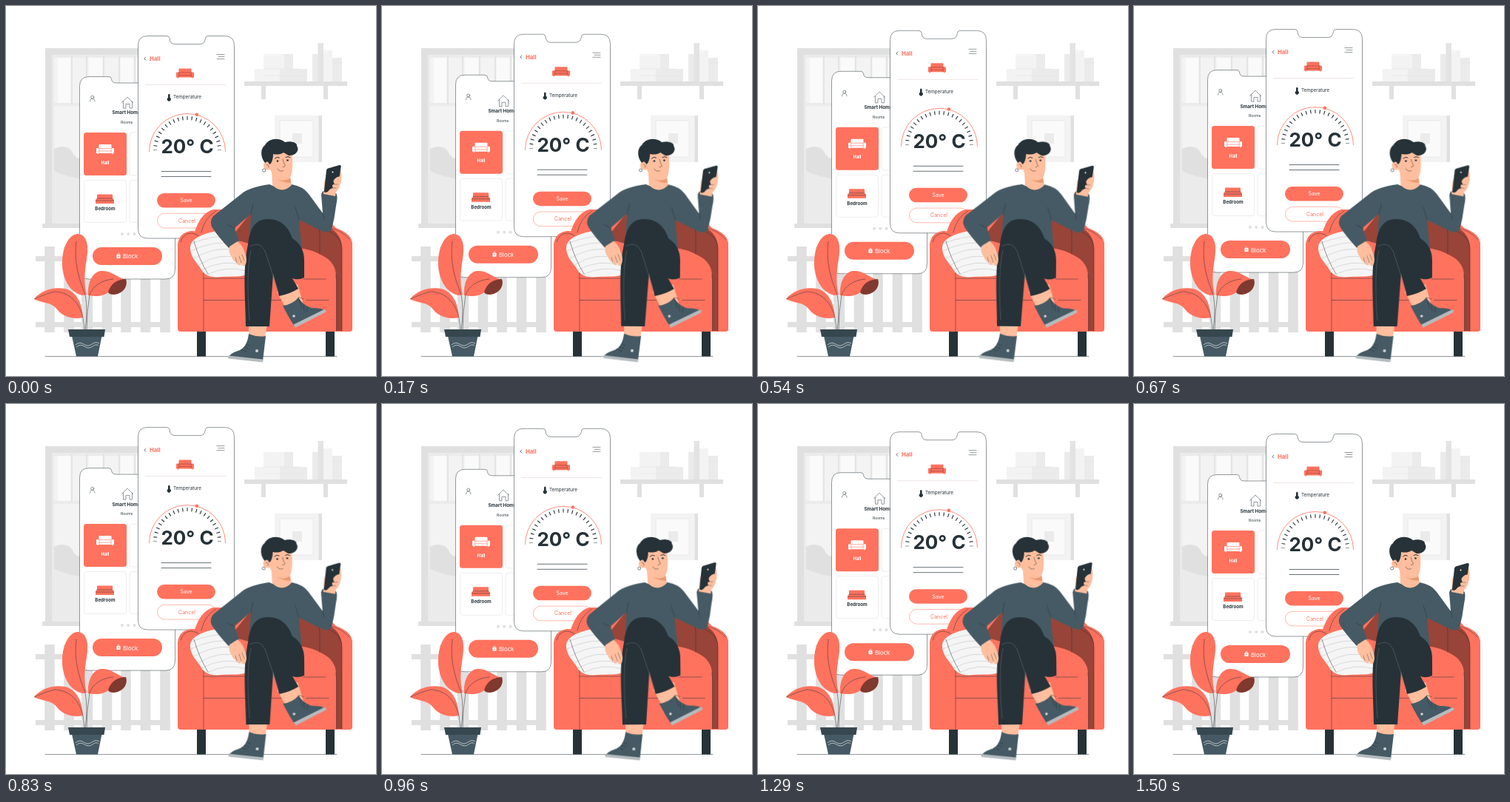
Recreate the animation shown at these times as an HTML page. Size 500 by 500 pixels, loop 1540 ms.

```html
<!DOCTYPE html>
<html lang="en">
<head>
<meta charset="utf-8">
<title>Smart home</title>
<style>
  html, body { margin: 0; width: 100%; height: 100%; overflow: hidden; background: #fff; }
  svg { display: block; width: 100vw; height: 100vh; }
  text { font-family: Inter, "Open Sans", sans-serif; }
  .bold { font-weight: 700; }
  .mid { text-anchor: middle; }
  .coral { fill: #ff725e; }
  .shade { fill: #994438; }
  .dark { fill: #263238; }
  .slate { fill: #455a64; }
  .skin { fill: #ffbe9d; }
  .white { fill: #fff; }
  .g1 { fill: #e0e0e0; }
  .g2 { fill: #ebebeb; }
  .g3 { fill: #f3f3f3; }
  .ink { fill: none; stroke: #263238; stroke-width: .5; stroke-linecap: round; stroke-linejoin: round; }
  .pale { fill: none; stroke: #e6e6e6; stroke-width: .7; }
  .screen { fill: #fff; stroke: #263238; stroke-width: .5; }

  /* 1500 ms of motion, then a 40 ms rest */
  #phones { animation: float 1540ms linear infinite; }
  #man { transform-box: view-box; transform-origin: 365px 331px; animation: sway 1540ms linear infinite; }
  @keyframes float {
    0%, 97.4%, 100% { transform: translateY(0); }
    48.7% { transform: translateY(-10px); }
  }
  @keyframes sway {
    0%, 97.4%, 100% { transform: rotate(0deg); }
    24.35% { transform: rotate(1deg); }
    73.05% { transform: rotate(-1deg); }
  }
</style>
</head>
<body>
<svg viewBox="0 0 500 500" xmlns="http://www.w3.org/2000/svg">
  <defs>
    <g id="sofa">
      <path d="M3.500 5V1Q3.500 0 4.500 0H19.500Q20.500 0 20.500 1V5H23Q24 5 24 6V12H22.500V13H21V12H3V13H1.500V12H0V6Q0 5 1 5Z"/>
    </g>
    <path id="seams" d="M3.800 5V11.500M20.200 5V11.500M3.800 5.500H20.200M3.800 9H20.200" fill="none" stroke-width=".6"/>
  </defs>

  <g id="window">
    <path class="g1" d="M53 57H225V300H53Z"/>
    <path class="g2" d="M62 66H225V294H62Z"/>
    <path class="g3" d="M65 70H225V131H65ZM65 135H225V290H65Z"/>
    <path class="white" opacity=".65" d="M70 70H87V131H70ZM112 70H130V131H112ZM155 70H172V131H155Z"/>
    <path d="M89 68V132M109 68V132M132 68V132M153 68V132M174 68V132" stroke="#e0e0e0" stroke-width="1.500"/>
    <path class="g1" d="M65 193C76 187 87 190 91 200C94 205 98 206 104 207V234C90 232 77 229 65 223Z"/>
    <path class="g2" d="M65 223C77 229 90 232 104 234V290H65Z"/>
    <path class="g1" d="M49 294H225V300H49Z"/>
  </g>

  <g id="fence" class="g1">
    <path d="M40 338H222V345H40ZM40 427H222V434H40Z"/>
    <path d="M59 325V441M85 325V441M110.500 325V441M136.500 325V441M162 325V441M188.500 325V441M215 325V441" stroke="#e0e0e0" stroke-width="13.500"/>
  </g>

  <g id="shelf">
    <path class="g1" d="M322 102H461V108H322ZM345 108H351V126H345ZM429 108H435V126H429Z"/>
    <path class="g3" d="M348 65H388V85H348ZM336 85H407V102H336ZM429 60H441V102H429Z"/>
    <path class="g2" d="M376 65H388V85H376ZM370 85H407V102H370ZM414 65H422V102H414ZM441 70H454V102H441Z"/>
    <path d="M421.500 50H429V102H421.500Z" fill="#e3e3e3"/>
    <path class="pale" d="M348 85H397M348 94H407M421.500 57H429M441 77H454"/>
  </g>

  <g id="picture">
    <path class="g3" d="M363 148H423V211H363Z"/>
    <path class="g1" d="M422.500 148H427V211H422.500Z"/>
    <path d="M370 155H415V204H370Z" fill="#fafafa" stroke="#e6e6e6" stroke-width=".8"/>
    <path class="g2" d="M387 172H400V186H387Z"/>
  </g>

  <path class="ink" d="M53 473.500H447"/>

  <g id="phones">
    <g id="back">
      <path class="screen" d="M112 95.500H139Q142 95.500 142.500 98.500Q143 104 149 104H179Q185 104 185.500 98.500Q186 95.500 189 95.500H215.500Q228.500 95.500 228.500 108.500V356Q228.500 369 215.500 369H112Q99.500 369 99.500 356V108.500Q99.500 95.500 112 95.500Z"/>
      <g class="ink">
        <circle cx="116.700" cy="123.200" r="2"/>
        <path d="M113.500 129Q113.500 125.300 116.700 125.300T120 129"/>
        <path d="M156.500 130.500L164 123L171.500 130.500M158.500 129V138H162V132.500H167V138H170.500V129"/>
      </g>
      <text class="bold dark" x="143.500" y="146.500" font-size="6.300">Smart Home</text>
      <text class="dark" x="155" y="159" font-size="5">Rooms</text>
      <rect class="coral" x="105" y="171" width="58" height="58" rx="3.500"/>
      <g transform="translate(122 187)">
        <use href="#sofa" class="white"/>
        <use href="#seams" stroke="#ff725e"/>
      </g>
      <text class="bold white mid" x="134" y="213.700" font-size="5.800">Hall</text>
      <g class="pale">
        <rect x="105.500" y="235.500" width="57" height="57" rx="3.500"/>
        <rect x="167" y="171" width="58" height="58" rx="3.500"/>
        <rect x="167" y="235.500" width="58" height="57" rx="3.500"/>
      </g>
      <path class="coral" d="M123 260V255.500Q123 254.500 124 254.500H143Q144 254.500 144 255.500V260L146 262V267H121V262Z"/>
      <path class="ink" d="M123 260H144M121.500 263H145.500"/>
      <text class="bold dark mid" x="134" y="276" font-size="6.200">Bedroom</text>
      <g class="g1"><circle cx="157" cy="308" r="2"/><circle cx="165.200" cy="308" r="2"/><circle cx="173.500" cy="308" r="2"/></g>
      <rect class="coral" x="117" y="326" width="94" height="24" rx="12"/>
      <rect class="white" x="149.500" y="336" width="5" height="5" rx=".6"/>
      <path d="M150.700 336V335.300Q152 333.500 153.300 335.300V336" fill="none" stroke="#fff" stroke-width=".7"/>
      <circle class="coral" cx="152" cy="338.400" r=".8"/>
      <text class="white" x="158" y="341.500" font-size="7.800">Block</text>
    </g>

    <g id="front">
      <path class="screen" d="M191 40.500H217Q220.500 40.500 221 43.500Q221.500 51.500 228 51.500H262Q268.500 51.500 269.500 43.500Q270 40.500 273 40.500H295.500Q308.500 40.500 308.500 53.500V301Q308.500 314 295.500 314H191.500Q178.500 314 178.500 301V53.500Q178.500 40.500 191 40.500Z"/>
      <path d="M189 69L187 71.200L189 73.400" fill="none" stroke="#263238" stroke-width=".7"/>
      <text class="bold coral" x="194" y="74" font-size="7.800">Hall</text>
      <path class="ink" d="M285 65.500H295M287 68.500H295M285 71.500H295"/>
      <g transform="translate(230 84.500)">
        <use href="#sofa" class="coral"/>
        <use href="#seams" stroke="#8f3f35"/>
      </g>
      <path d="M188 106.500H297" stroke="#e6dad8" stroke-width=".7"/>
      <path class="dark" d="M219 120Q220.300 117.500 221.600 120V124A2.500 2.500 0 1 1 219 124Z"/>
      <text class="dark" x="226" y="125" font-size="6.300">Temperature</text>
      <path d="M193.500 197A51.500 51.500 0 0 1 296.500 197" fill="none" stroke="#ff725e" stroke-width=".8"/>
      <path d="M201.500 195A43.500 43.500 0 0 1 288.500 195" pathLength="22" fill="none" stroke="#263238" stroke-width="5" stroke-dasharray=".18 .82" stroke-dashoffset=".09"/>
      <circle class="coral" cx="257.800" cy="146.700" r="2.300"/>
      <text class="bold dark mid" x="245" y="199" font-size="26">20° C</text>
      <path class="ink" d="M210 223.500H277M210 230.500H277" style="stroke-width:.7"/>
      <rect class="coral" x="204" y="253" width="79" height="19.500" rx="9.750"/>
      <text class="white mid" x="243.500" y="265.400" font-size="7">Save</text>
      <rect x="204.500" y="280.300" width="79" height="19.700" rx="9.850" fill="#fff" stroke="#ff725e" stroke-width=".5"/>
      <text class="coral mid" x="244.500" y="292.600" font-size="7">Cancel</text>
    </g>
  </g>

  <g id="plant">
    <path d="M103 438Q106 415 103 388M108 438Q110 410 116 389M105 438Q105 425 100 411" fill="none" stroke="#e0e0e0" stroke-width="3.500"/>
    <path class="coral" d="M104 391C85 388 75 365 76 345C77 322 87 308 97 308C110 309 112 325 109 342C106 360 105 375 109 390Z"/>
    <path class="ink" d="M95 318C92 345 97 365 107 390Q111 412 107 437"/>
    <path class="coral" d="M38 396C47 384 64 379 80 382C97 387 103 403 104 421C91 424 77 420 69 410C62 400 50 402 38 396Z"/>
    <path class="ink" d="M38 396Q56 388 66 386C87 387 99 401 104 421L106 437"/>
    <path class="coral" d="M111 391C110 375 116 360 128 358C142 357 148 366 162 370C157 380 149 378 141 385C132 393 121 393 111 391Z"/>
    <path d="M138 387C141 375 151 369 162 369C165 377 160 386 151 389C145 391 140 390 138 387Z" fill="#7f392f"/>
    <path class="ink" d="M145 369C129 370 117 379 113 390Q109 414 109 437"/>
    <path class="slate" d="M89 446H129.500L124 473.500H95Z"/>
    <path d="M84 437H134L132.500 447H86Z" fill="#37474f"/>
    <path d="M94 458Q99 453 105 457T116 457T126 456M95 461Q100 456 106 460T117 460T125 459" fill="none" stroke="#fff" stroke-width=".6"/>
  </g>

  <g id="couch">
    <path class="dark" d="M258 436H270V473.500H258ZM432 436H444V473.500H432Z"/>
    <path class="coral" d="M254 308Q262 280 280 275H395Q430 281 446 300Q468 308 468 322V437Q468 440 464 440H400L256 430Z"/>
    <path class="shade" d="M303 314L332 278V322ZM394 277Q423 284 436 299Q454 308 454 328V439H446V362Q444 346 429 338Q414 329 396 327Z"/>
    <path class="ink" d="M264 306Q268 286 284 277M396 278Q421 284 424 305V335M424 300Q453 307 454 328V439M446 362V439M437 300Q452 302 464 315"/>
    <path class="coral" d="M232 322Q234 306 250 304Q268 304 268 326V368H446V440H236Q232 440 232 436Z"/>
    <path class="ink" d="M236 319Q239 307 251 307Q267 309 267 326V439M267 368H330M402 369H432M267 397.500H380M406 397.500H436"/>
  </g>

  <g id="pillow">
    <path d="M249 327C249 316 261 310 276 306C290 302 304 302 308 306C312 320 321 339 327 362C318 367 305 365 291 366C275 368 267 363 262 353C256 345 249 338 249 327Z" fill="#f5f5f5"/>
    <path d="M251 321Q280 309 309 311M250 331Q282 315 313 322M254 341Q287 322 316 332M260 350Q290 331 320 342M264 357Q294 341 323 351M272 363Q298 350 325 358" fill="none" stroke="#c4c4c4" stroke-width=".6"/>
    <path class="ink" d="M254 318Q261 343 273 362"/>
  </g>

  <g id="man">
    <g id="feet">
      <path class="skin" d="M328 428H353L350 450L328 448ZM366 386L394 376L402 403L380 412Z"/>
      <path class="slate" d="M328 443Q340 448 351 446L347 480L301 475Q301 470 316 465Q326 460 328 443Z"/>
      <path d="M300.500 472.500L347.500 477.500L347 481.500L301 476.500Q299 475 300.500 472.500Z" fill="#b5bbbe"/>
      <circle cx="339" cy="466" r="2" fill="#cfd4d6"/>
      <path class="ink" d="M318 464L325 467M322 461L328 463M325 457L330 459"/>
      <path class="slate" d="M374 405Q388 403 395 394Q402 405 413 408Q428 408 432 412L390 433Q382 421 374 405Z"/>
      <path d="M388.500 430.500L430 410Q434 411 431.500 414L391 434.500Z" fill="#b5bbbe"/>
      <circle cx="389" cy="419" r="1.800" fill="#cfd4d6"/>
      <path class="ink" d="M397 399L400 409M402 403L403 412M407 406L407 413M397 399Q391 390 402 396"/>
    </g>

    <g id="body">
      <path class="slate" d="M356 241Q372 249 386 241Q402 244 409 254L428 280L426 255Q427 249 432 249L446 253Q449 256 446 270Q444 287 440 302Q435 308 427 304L396 289L401 346H327L331 281L309 300L315 318L301 327Q287 312 279 300Q274 292 280 284L318 254Q328 245 356 241Z"/>
      <path class="ink" d="M331 282L334 267M396 289L391 272M300 296L310 301M428 280L430 288"/>
    </g>

    <g id="legs">
      <path class="dark" d="M327 322C330 297 339 288 354 288C372 288 382 299 387 314Q403 324 403 344V367Q395 371 387 368L395 382Q384 389 369 392L361 362L356 433H324C324 399 319 360 327 322Z"/>
      <path d="M329 325Q343 317 350 331L368 386M331 330Q324 360 329 425" fill="none" stroke="#5c6970" stroke-width=".6"/>
    </g>

    <g id="hand">
      <path class="skin" d="M302 325L313 318Q321 325 323 334Q327 343 323 351Q319 352 318 347Q316 354 312 347Q307 345 305 339Q300 333 302 325Z"/>
      <path class="ink" d="M318 347L315 338M322 344L319 336M312 347L310 340" style="stroke-width:.4"/>
    </g>

    <g id="device">
      <path class="skin" d="M429 254L430 237Q432 230 440 226L452 222Q455 230 452 239Q451 247 446 251L445 257Z"/>
      <path class="dark" d="M435 219.500L450.500 215Q453 214.500 452.700 217L448.500 245Q448 247 446 247.600L432 252Q429.500 252 430 249.500L433 222Q433.300 220 435 219.500Z"/>
      <circle class="white" cx="441.500" cy="224.500" r="1"/>
      <path class="skin" d="M444 234Q448 229 453 231Q454 239 449 246L444 251L434 252Q438 246 442 246Q439 241 444 241Q441 236 444 234Z"/>
      <path class="ink" d="M444 241H448M442 246H446" style="stroke-width:.4"/>
    </g>

    <g id="head">
      <path class="skin" d="M359 223L360 242Q373 255 386 242L384 229Z"/>
      <path d="M365 232Q373 239 384 233L385 239Q372 239 365 232Z" fill="#eb996e"/>
      <path class="skin" d="M357 198H386Q389 218 385 230Q378 238 368 233Q360 229 357 221Q349 223 348 216Q348 209 356 211Z"/>
      <path class="dark" d="M350 212C344 205 343 193 350 188C355 179 368 177 377 184C386 182 394 185 393 189C397 194 392 203 382 202C379 201 378 199 375 198C371 201 365 201 361 200C361 207 359 213 356 214Q354 208 350 212Z"/>
      <circle cx="348.700" cy="222" r="2" fill="none" stroke="#263238" stroke-width=".6"/>
      <circle class="dark" cx="367" cy="209.500" r="1.300"/><circle class="dark" cx="380.500" cy="208.500" r="1.300"/>
      <path class="ink" d="M363.500 206Q366 203 369.500 205M378 204.500Q381 202.500 384 204.500" style="stroke-width:1"/>
      <path class="ink" d="M374 207Q375 212 377.500 216Q376 218 374 217.500M367 220Q370 225 374.500 222.500M352 214Q355 214 355 218"/>
    </g>
  </g>
</svg>
</body>
</html>
```
